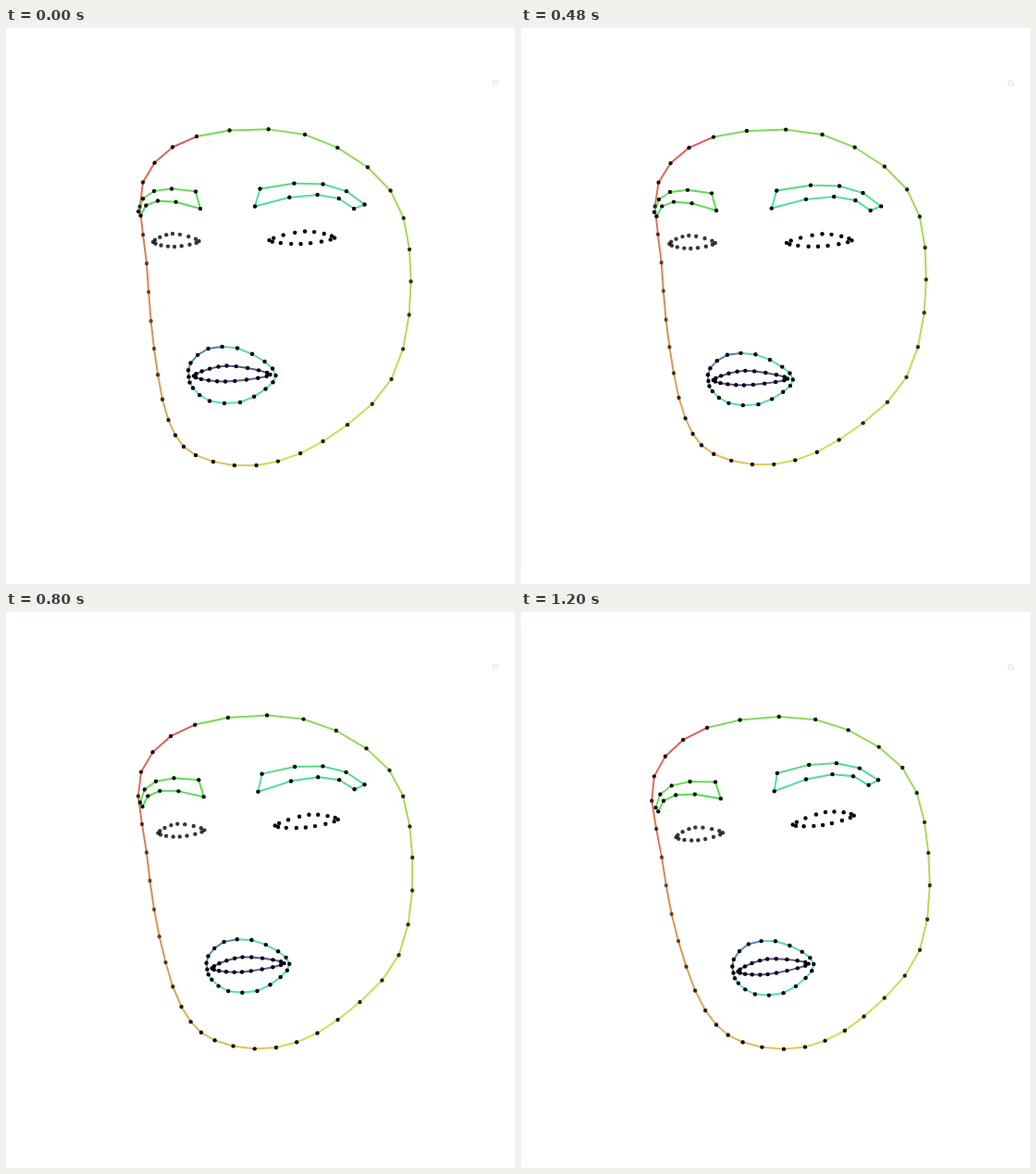
Animation of 550x600 px, one loop 1280 ms. Source, as an HTML page:

```html
<!DOCTYPE html>
<html lang="en">
<head>
<meta charset="utf-8">
<title>Face landmarks</title>
<style>
html, body { margin: 0; width: 100%; height: 100%; overflow: hidden; background: #fff; }
svg { display: block; width: 100%; height: 100%; }
line { stroke-width: 2; stroke-linecap: square; }
</style>
</head>
<body>
<svg id="stage" viewBox="0 0 550 600">
  <rect x="526.5" y="57" width="5" height="5" rx=".6" fill="#fff" stroke="#e2e2e2"/>
</svg>
<script>
const STEP = 80, STEPS = 16;

const pts = text => text.split(" ").map(p => p.split(",").map(Number));
const mix = (a, b, u) => a + (b - a) * u;
const clamp = u => Math.min(1, Math.max(0, u));
const smooth = u => u * u * (3 - 2 * u);
const bump = (i, at, width) => Math.exp(-(((i - at) / width) ** 2));

// Closed Catmull-Rom curve through the keys, sampled n times per key
function ring(text, n) {
  const keys = pts(text), count = keys.length;
  return Array.from({ length: count * n }, (_, i) => {
    const k = Math.floor(i / n), t = i % n / n;
    const [a, b, c, d] = [-1, 0, 1, 2].map(j => keys[(k + j + count) % count]);
    return [0, 1].map(m => b[m] + t / 2 * (c[m] - a[m]
      + t * (2 * a[m] - 5 * b[m] + 4 * c[m] - d[m])
      + t * t * (3 * b[m] - a[m] - 3 * c[m] + d[m])));
  });
}

// Five points on the parabola through three keys
function arc(text) {
  const [a, b, c] = pts(text);
  return [0, .25, .5, .75, 1].map(t => [0, 1].map(m =>
    a[m] * (1 - t) * (1 - 2 * t) + b[m] * 4 * t * (1 - t) + c[m] * t * (2 * t - 1)));
}

const brow = (upper, lower) => [...arc(upper), ...arc(lower).reverse()];

// Offset that varies linearly around a centre: [base, per x, per y] for each axis
const lean = (cx, cy, h, v) => ([x, y]) =>
  [h, v].map(([base, px = 0, py = 0]) => base + px * (x - cx) + py * (y - cy));

const lipDrift = lean(245, 375, [3.2, -.027], [4.4, 0, -.08]);
const lipTurn = lean(245, 375, [28.3, -.075, .1], [9, -.085, -.04]);

// "drift" is the offset after the first move, of which "early" is done in four
// steps; "turn" is the offset at the end. Parts without a hue have no outline.
const parts = [
  {
    points: ring("206,117 148,166.5 152,254 160,346 175.5,423 205,461 270.5,472 342.5,446 416.5,379 437.5,273.5 415.5,175.5 323,115", 3),
    drift(p, i) {
      const a = i * Math.PI / 18;
      return [1.2 + 1.5 * Math.cos(2 * a - 5.4), -1.1 + .8 * Math.cos(a) + .8 * Math.cos(2 * a)];
    },
    turn(p, i) {
      const a = (i - 17) * Math.PI / 18;
      return [11.1 + 21 * Math.cos(a) + 5 * Math.cos(2 * a), .2 + 12.5 * Math.cos(a + 1.83) + 2.6 * Math.cos(2 * a)];
    },
    early: y => .95 - .65 * (y - 110) / 363,
    hue: i => 3.6 + 2.9 * i,
    alpha: i => .95 - .4 * bump(i, 7.5, 4) - .2 * bump(i, 26, 5)
  },
  {
    points: brow("143,198 160,176 205,176.5", "145.5,202.5 164,186.5 210,195"),
    drift: lean(172, 188, [1], [1.1, .02]),
    turn: lean(172, 188, [3.7, .05, .03], [10.2, -.1]),
    early: () => .6,
    hue: i => 108 + 2 * i,
    alpha: () => .92
  },
  {
    points: brow("274.5,173.5 342.5,168.5 387.5,190.5", "269,192.5 336.5,180 376,195"),
    drift: lean(330, 182, [1.7], [2.1]),
    turn: lean(330, 182, [.5, -.05, .11], [-4.3, -.085]),
    early: () => .6,
    hue: i => 140 + 2 * i,
    alpha: () => 1
  },
  {
    points: ring("159,231 180,222 208.5,230 182,236", 4),
    drift: lean(183, 230, [1.2], [1.8]),
    turn: lean(183, 230, [9, .02, .07], [10.2, -.08]),
    early: () => .5,
    alpha: () => .78
  },
  {
    points: ring("284.5,229 323,219.5 355,226.5 318.5,233", 4),
    drift: lean(320, 226, [2.4], [2.9]),
    turn: lean(320, 226, [6.8, -.06, .1], [-3.2, -.105]),
    early: () => .55,
    alpha: () => 1
  },
  {
    points: ring("197.5,376.5 199.5,361.5 218.5,346 250,345.5 279.5,360 291.5,375 280.5,389.5 253,404 220,402.5 202,388.5", 2),
    drift: lipDrift,
    turn: lipTurn,
    early: () => .45,
    hue: i => i < 5 ? 205 + 3 * i : 155 + 1.6 * (i - 5),
    tone: i => i < 5 ? "40%, 54%" : "65%, 60%",
    alpha: () => 1
  },
  {
    points: ring("203,375.5 238.5,364.5 285.5,374 237,381.5", 5),
    drift: lipDrift,
    turn: lipTurn,
    early: () => .45,
    hue: i => 245 + 1.4 * i,
    tone: () => "28%, 45%",
    alpha: () => 1
  }
];

const stage = document.getElementById("stage");

function set(el, attrs) {
  for (const key in attrs) el.setAttribute(key, attrs[key]);
}

function add(name, attrs) {
  const el = document.createElementNS("http://www.w3.org/2000/svg", name);
  set(el, attrs);
  return stage.appendChild(el);
}

for (const part of parts) {
  part.lines = part.hue ? part.points.map((_, i) => add("line", {
    stroke: `hsl(${part.hue(i)}, ${part.tone ? part.tone(i) : "65%, 60%"})`
  })) : [];
}
for (const part of parts) {
  part.dots = part.points.map((_, i) => add("circle", { r: 2.2, "fill-opacity": part.alpha(i) }));
}

function place(part, p, i, step) {
  const early = part.early(p[1]);
  const drifted = step < 4 ? early * step / 4 : mix(early, 1, clamp((step - 4) / 2));
  const turned = smooth(clamp((step - 5.3) / 8.7));
  const drift = part.drift(p, i), turn = part.turn(p, i);
  return p.map((v, m) => v + mix(drift[m] * drifted, turn[m], turned));
}

function draw(step) {
  for (const part of parts) {
    const pose = part.points.map((p, i) => place(part, p, i, step));
    part.dots.forEach((dot, i) => set(dot, { cx: pose[i][0], cy: pose[i][1] }));
    part.lines.forEach((line, i) => {
      const [x1, y1] = pose[i], [x2, y2] = pose[(i + 1) % pose.length];
      set(line, { x1, y1, x2, y2 });
    });
  }
}

const start = performance.now();
let shown = 0;
function tick() {
  const step = Math.floor((performance.now() - start) / STEP) % STEPS;
  if (step !== shown) draw(shown = step);
  requestAnimationFrame(tick);
}
draw(0);
tick();
</script>
</body>
</html>
```
